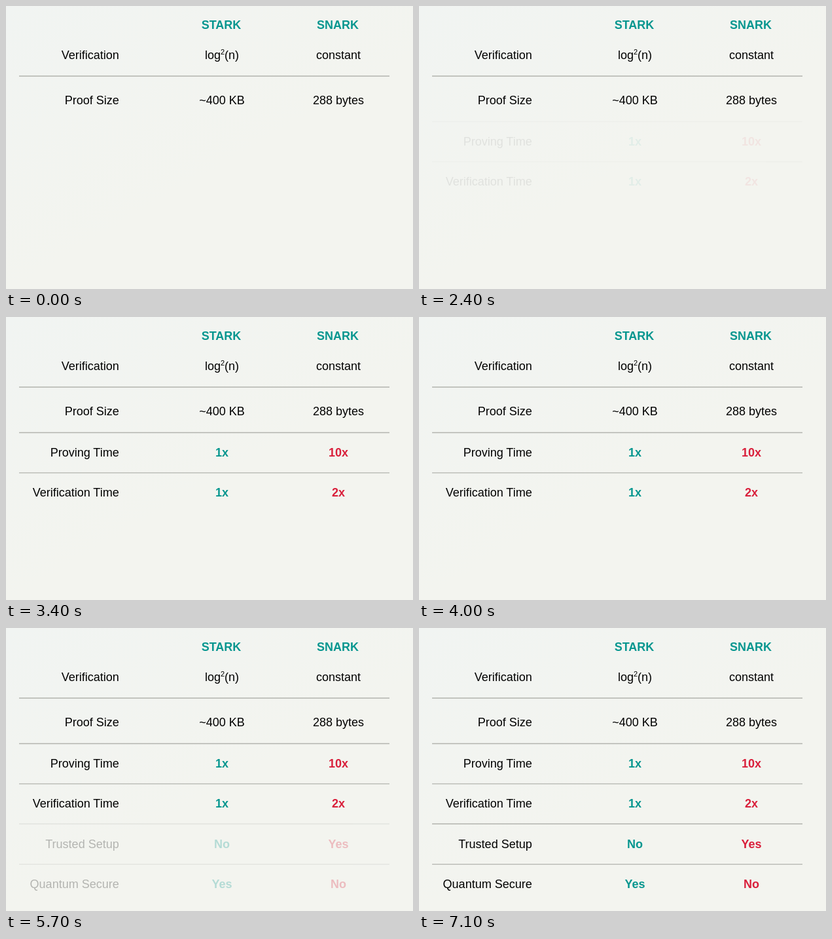
An HTML page that plays this animation: 622 by 432 pixels, repeating every 8.7 s.

```html
<!DOCTYPE html>
<html lang="en">
<head>
<meta charset="utf-8">
<title>STARK and SNARK</title>
<style>
  html, body { margin: 0; width: 100%; height: 100%; overflow: hidden; }
  body { background: linear-gradient(150deg, #f1f4f2, #f3f4ef 55%); }
  svg { display: block; width: 622px; height: 432px; }
  text { font: 18px "Liberation Sans", Arial, sans-serif; text-anchor: middle; }
  .label { text-anchor: end; }
  .good, .bad { font-weight: bold; }
  .good { fill: #06968f; }
  .bad { fill: #d91f3b; }
  .sup { font-size: 11px; }
  line { stroke: #b2b3ae; stroke-width: 1.3; }
  .timing { animation: timing 8.7s linear infinite; }
  .trust { animation: trust 8.7s linear infinite; }
  /* one-second fades starting at 2.33 s and 5.44 s */
  @keyframes timing {
    0%, 26.78% { opacity: 0; }
    38.28%, 100% { opacity: 1; }
  }
  @keyframes trust {
    0%, 62.53% { opacity: 0; }
    74.02%, 100% { opacity: 1; }
  }
</style>
</head>
<body>
<svg viewBox="0 0 622 432">
  <text class="good" x="329" y="35">STARK</text>
  <text class="good" x="507" y="35">SNARK</text>

  <text class="label" x="172.7" y="81">Verification</text>
  <text x="330" y="81">log<tspan class="sup" dy="-7">2</tspan><tspan dy="7">(n)</tspan></text>
  <text x="508" y="81">constant</text>

  <line x1="20" x2="586" y1="107" y2="107"/>
  <text class="label" x="172.7" y="150.3">Proof Size</text>
  <text x="330" y="150.3">~400 KB</text>
  <text x="508" y="150.3">288 bytes</text>

  <g class="timing">
    <line x1="20" x2="586" y1="176.5" y2="176.5"/>
    <text class="label" x="172.7" y="213">Proving Time</text>
    <text class="good" x="330" y="213">1x</text>
    <text class="bad" x="508" y="213">10x</text>

    <line x1="20" x2="586" y1="237.8" y2="237.8"/>
    <text class="label" x="172.7" y="274.3">Verification Time</text>
    <text class="good" x="330" y="274.3">1x</text>
    <text class="bad" x="508" y="274.3">2x</text>
  </g>

  <g class="trust">
    <line x1="20" x2="586" y1="299" y2="299"/>
    <text class="label" x="172.7" y="336">Trusted Setup</text>
    <text class="good" x="330" y="336">No</text>
    <text class="bad" x="508" y="336">Yes</text>

    <line x1="20" x2="586" y1="360.7" y2="360.7"/>
    <text class="label" x="172.7" y="397.3">Quantum Secure</text>
    <text class="good" x="330" y="397.3">Yes</text>
    <text class="bad" x="508" y="397.3">No</text>
  </g>
</svg>
</body>
</html>
```
